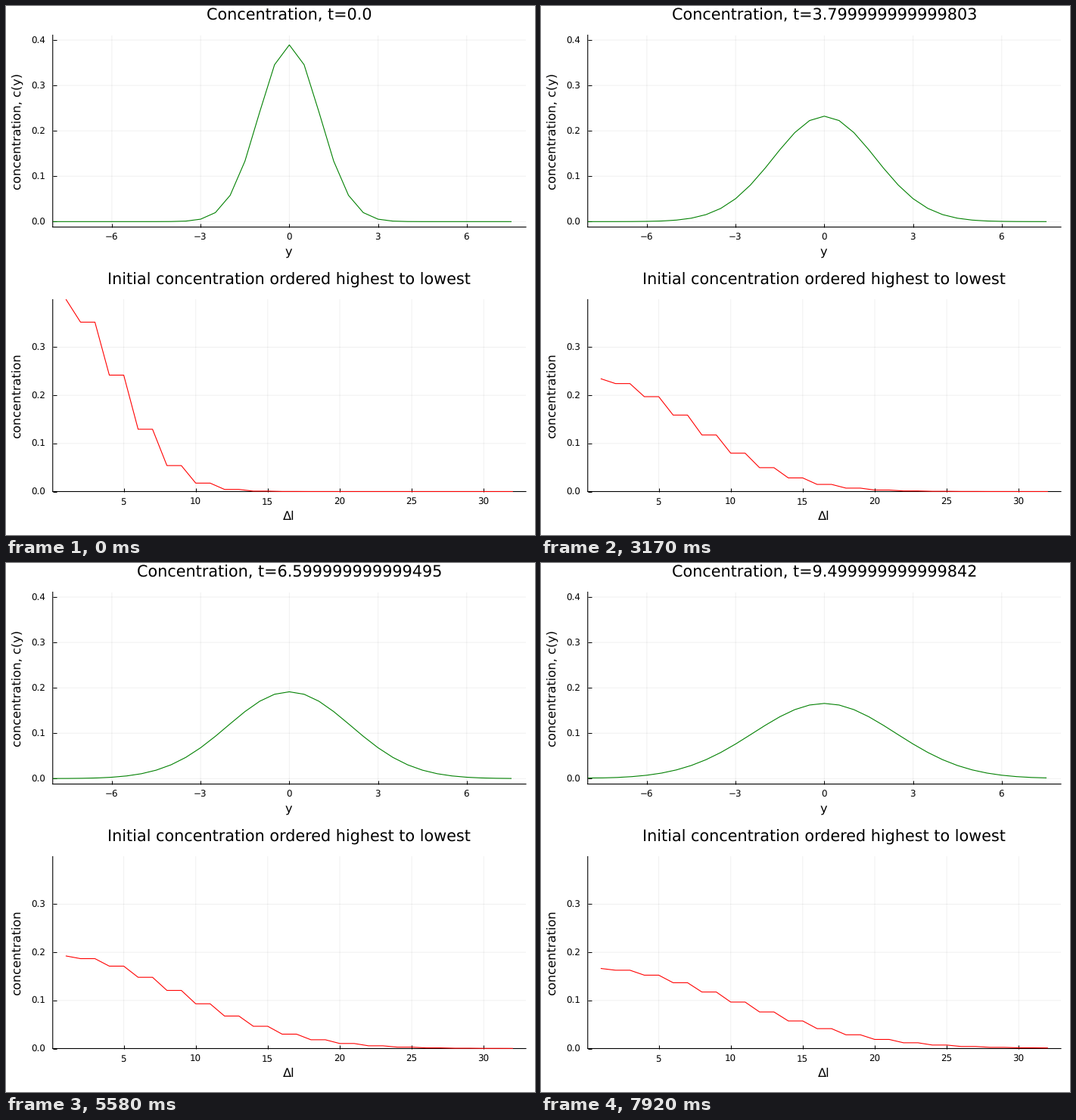
A matplotlib script for the animation above (8000 ms loop, 699 px wide and 700 px high).

```python
from itertools import accumulate, repeat

import matplotlib.pyplot as plt
import numpy as np
from matplotlib.animation import FuncAnimation

W, H, DPI = 699, 700, 64
FRAMES, LOOP_MS = 96, 8000
LEFT, RIGHT, PLOT_H = 61.75, 687, 254
MID = 374.5
DT, STEPS = 0.002, 50        # time step, steps per frame
PERIOD = 16.0
PEAK = 1 / np.sqrt(2 * np.pi)

plt.rcParams.update({
    "font.family": "DejaVu Sans",
    "text.hinting": "none",
    "path.simplify": False,
    "path.snap": False,
})


def pt(px):
    return px * 72 / DPI


TITLE, LABEL, TICK = pt(20.74), pt(16.3), pt(11.85)

y = np.arange(-8, 8, 0.5)
rank = np.arange(1, len(y) + 1)
times = list(accumulate(repeat(DT, FRAMES * STEPS), initial=0.0))[::STEPS]


def concentration(t):
    """Spreading Gaussian on a periodic domain."""
    var = 1 + 0.5 * t
    images = [np.exp(-(y + k * PERIOD) ** 2 / (2 * var)) for k in (-1, 0, 1)]
    return PEAK / np.sqrt(var) * np.sum(images, axis=0)


fig = plt.figure(figsize=(W / DPI, H / DPI), dpi=DPI, facecolor="white")


def write(x, base, text, size, ha="center", **kw):
    return fig.text(x / W, 1 - base / H, text, size=size, ha=ha,
                    va="baseline", color="black", **kw)


def panel(top, xlim, ylim, xticks, yticks, ylabel):
    bottom = top + PLOT_H
    ax = fig.add_axes([LEFT / W, 1 - bottom / H,
                       (RIGHT - LEFT) / W, PLOT_H / H], facecolor="none")
    ax.set(xlim=xlim, ylim=ylim, xticks=xticks, yticks=yticks)
    ax.set_axisbelow(True)
    ax.grid(color="black", alpha=0.06, linewidth=pt(1))
    ax.tick_params(direction="in", length=pt(5), width=pt(1),
                   labelbottom=False, labelleft=False)
    ax.spines[["top", "right"]].set_visible(False)
    for side in ("left", "bottom"):
        ax.spines[side].set(linewidth=pt(1.1), zorder=1)

    for v in xticks:
        x = LEFT + (v - xlim[0]) / (xlim[1] - xlim[0]) * (RIGHT - LEFT)
        write(x - 0.4, bottom + 17, str(v).replace("-", "\u2212"), TICK)
    for v in yticks:
        pos = bottom - (v - ylim[0]) / (ylim[1] - ylim[0]) * PLOT_H
        write(52.1, pos + 4.4, f"{v:.1f}", TICK, ha="right")
    write(19.2, top + PLOT_H / 2, ylabel, LABEL,
          rotation=90, rotation_mode="anchor")
    return ax


def curve(ax, x, color):
    return ax.plot(x, np.zeros(len(x)), color=color, linewidth=pt(1.1),
                   solid_joinstyle="round", zorder=3)[0]


pad = 0.03 * PEAK
top_ax = panel(38.5, (-8, 8), (-pad, PEAK + pad), [-6, -3, 0, 3, 6],
               [0, 0.1, 0.2, 0.3, 0.4], "concentration, c(y)")
low_ax = panel(388.5, (0.07, 32.93), (0, PEAK), [5, 10, 15, 20, 25, 30],
               [0, 0.1, 0.2, 0.3], "concentration")

title = write(MID, 18.5, "", TITLE)
write(MID - 0.8, 368.5, "Initial concentration ordered highest to lowest",
      TITLE)
write(MID - 0.8, 331, "y", LABEL)
write(MID - 0.8, 680.5, "\u0394l", LABEL)

green = curve(top_ax, y, "green")
red = curve(low_ax, rank, "red")


def draw(i):
    t = times[i]
    title.set_text(f"Concentration, t={t!r}")
    green.set_ydata(concentration(t + DT * STEPS))
    red.set_ydata(np.sort(concentration(t))[::-1])
    return title, green, red


anim = FuncAnimation(fig, draw, frames=FRAMES, interval=LOOP_MS / FRAMES,
                     repeat=True, repeat_delay=0, blit=False)
plt.show()
```
